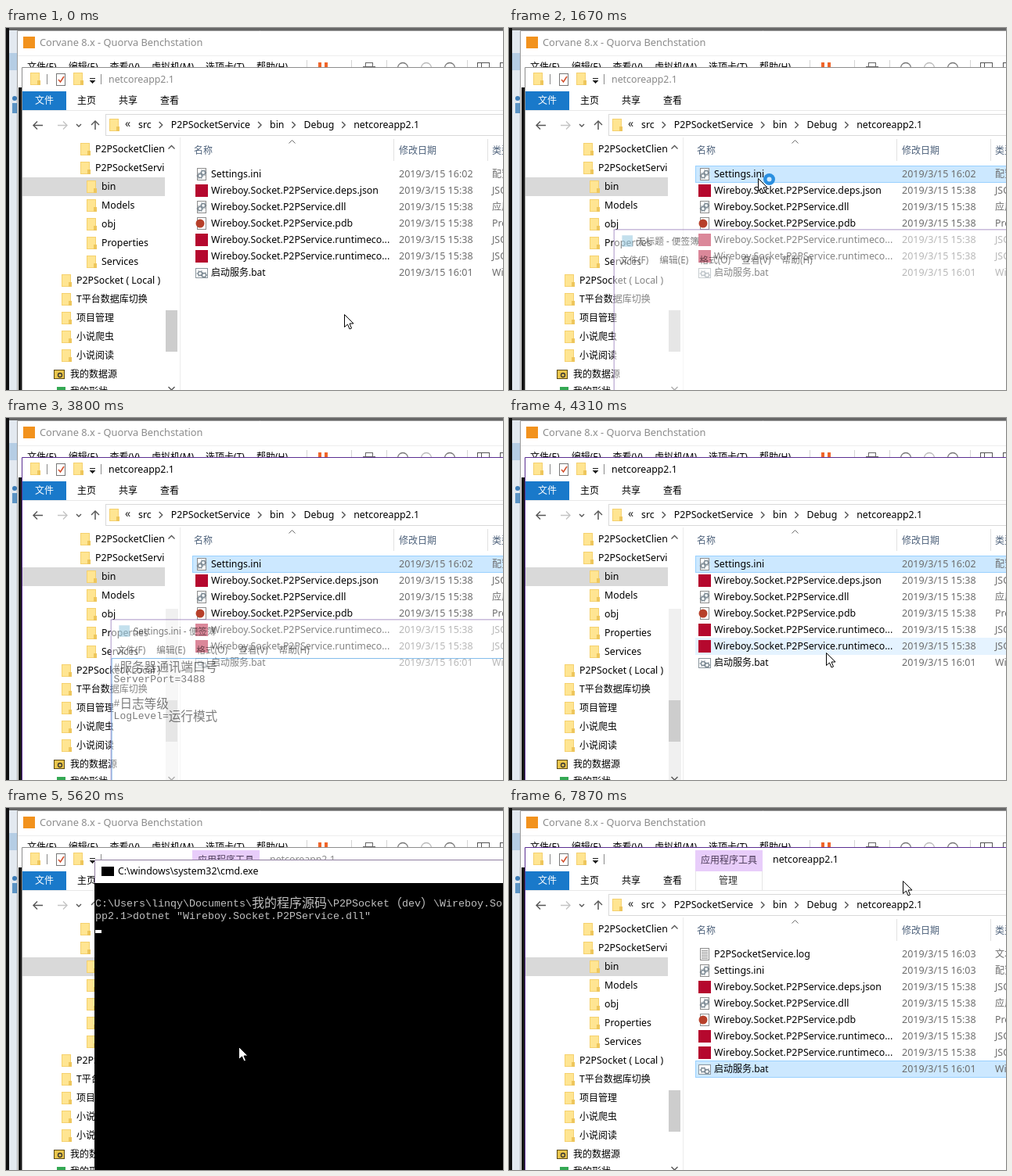
These frames come from a looping animation (635 px wide and 463 px high, 7.99 s). An HTML page with a canvas:

```html
<!DOCTYPE html>
<html lang="zh">
<head>
<meta charset="utf-8">
<style>
html, body { margin: 0; width: 100%; height: 100%; overflow: hidden; background: #fff; }
canvas { display: block; }
</style>
</head>
<body>
<canvas id="stage" width="635" height="463"></canvas>
<script>
const g = document.getElementById('stage').getContext('2d');
const LOOP = 7990, ACCENT = '#5a2d91', BLUE = '#cce8ff', GRAY = '#d9d9d9';
const HAN = /[\u3000-\u9fff\uff00-\uffef]/;
const SANS = '"Noto Sans", "Noto Sans CJK SC", "Noto Sans CJK", sans-serif';
const MONO = '"Liberation Mono", "Noto Sans CJK SC", "Noto Sans CJK", monospace';

// stops of the mouse: ms, x, y
const STOPS = [
  [0, 432, 366], [280, 431, 366], [850, 318, 197], [1000, 318, 192], [2090, 318, 192],
  [2570, 390, 273], [2840, 640, 290], [4070, 640, 270], [4310, 405, 300], [4700, 297, 305],
  [5620, 297, 305], [5770, 311, 301], [5890, 640, 290], [7860, 640, 93], [7870, 503, 93], [LOOP, 503, 93]];

const P = 'Wireboy.Socket.P2PService.';
const FILES = [
  ['Settings.ini', '16:02', '配置', 'gear'],
  [P + 'deps.json', '15:38', 'JSON', 'red'],
  [P + 'dll', '15:38', '应用', 'gear'],
  [P + 'pdb', '15:38', 'Prog', 'disc'],
  [P + 'runtimeco...', '15:38', 'JSON', 'red'],
  [P + 'runtimeco...', '15:38', 'JSON', 'red'],
  ['启动服务.bat', '16:01', 'Win', 'batch']];
const FILES_AFTER = [['P2PSocketService.log', '16:03', '文本', 'lines'],
  ['Settings.ini', '16:03', '配置', 'gear'], ...FILES.slice(1)];
// folders by the x of their icon
const TREE = {
  95: ['P2PSocketClient', 'P2PSocketService'],
  103: ['bin', 'Models', 'obj', 'Properties', 'Services'],
  71: ['P2PSocket ( Local )', 'T平台数据库切换', '项目管理', '小说爬虫', '小说阅读']
};
const TREE_ORDER = [95, 103, 71];

const within = (t, a, b) => t >= a && t < b;
const smooth = p => p * p * (3 - 2 * p);

function mouse(t) {
  const i = STOPS.findIndex(s => s[0] > t);
  const [a, ax, ay] = STOPS[i - 1], [b, bx, by] = STOPS[i];
  const p = smooth((t - a) / (b - a));
  return [ax + (bx - ax) * p, ay + (by - ay) * p];
}

// windows open in three steps of 120 ms and close in one
function opacity(t, open, close) {
  const n = t < open ? 0 : t < close ? Math.min(3, 1 + Math.floor((t - open) / 120)) : t < close + 120 ? 1 : 0;
  return 1 - (1 - n / 3) ** 1.8;
}
const editorAlpha = t => opacity(t, 1670, 3800);
const consoleAlpha = t => opacity(t, 5380, 7190);
const isActive = t => within(t, 1310, 1550) || within(t, 3800, 5380) || t >= 7190;

function selection(t) {
  if (within(t, 1310, 5100)) return [0, within(t, 2090, 3800) ? GRAY : BLUE];
  if (within(t, 5100, 5380)) return [6, BLUE];
  return t >= 5620 ? [7, t < 7190 ? GRAY : BLUE] : [-1];
}

function box(x, y, w, h, color) {
  g.fillStyle = color;
  g.fillRect(x, y, w, h);
}
function frame(x, y, w, h, color) {
  g.strokeStyle = color;
  g.lineWidth = 1;
  g.strokeRect(x + .5, y + .5, w - 1, h - 1);
}
function line(color, width, ...p) {
  g.strokeStyle = color;
  g.lineWidth = width;
  g.beginPath();
  for (let i = 0; i < p.length; i += 2) g.lineTo(p[i], p[i + 1]);
  g.stroke();
}
function ring(x, y, r, color, width) {
  g.strokeStyle = color;
  g.lineWidth = width;
  g.beginPath();
  g.arc(x, y, r, 0, 7);
  g.stroke();
}
function disc(x, y, r, color) {
  g.fillStyle = color;
  g.beginPath();
  g.arc(x, y, r, 0, 7);
  g.fill();
}
// y is the visual middle of the line; returns the right end
function text(s, x, y, color = '#000', size = HAN.test(s) ? 12 : 12.35) {
  g.font = size + 'px ' + SANS;
  g.fillStyle = color;
  g.fillText(s, x, y + 4.3);
  return x + g.measureText(s).width;
}
function menu(items, x, y, gap) {
  for (const s of items.split(' ')) x = text(s, x, y) + gap;
}
// half-width cells of 8 px, full-width cells of 16 px
function cells(s, x, y, color) {
  g.fillStyle = color;
  for (const c of s) {
    const wide = HAN.test(c);
    g.font = (wide ? 16 : 13.33) + 'px ' + MONO;
    g.fillText(c, x, y + (wide ? 6 : 4.5));
    x += wide ? 16 : 8;
  }
}
// arrow head pointing along (dx, dy)
function caret(x, y, dx, dy, r, color = '#555', width = 1.4) {
  line(color, width, x - r * (dx + dy), y - r * (dy + dx), x, y, x - r * (dx - dy), y - r * (dy - dx));
}

function folder(x, y) {
  box(x, y - 8, 12, 16, '#f5d16f');
  box(x + 1, y - 7, 10, 14, '#ffe592');
  box(x + 9, y + 2, 4, 6, '#eec65c');
}
function gear(x, y) {
  ring(x, y, 2.6, '#7e8b95', 1.5);
  for (let a = 0; a < 6; a += Math.PI / 3)
    line('#7e8b95', 1, x + 3 * Math.cos(a), y + 3 * Math.sin(a), x + 4.5 * Math.cos(a), y + 4.5 * Math.sin(a));
}
function fileIcon(kind, y) {
  if (kind == 'red') return box(242, y - 8, 16, 16, '#b5082e');
  if (kind == 'batch') {
    box(242, y - 6, 16, 13, '#fff');
    frame(242, y - 6, 16, 13, '#8a959d');
    gear(248, y + 1);
    return gear(253, y + 3);
  }
  box(244, y - 8, 12, 16, '#fff');
  frame(244, y - 8, 12, 16, '#8c8c8c');
  if (kind == 'disc') disc(248, y, 5.5, '#b7402a');
  else if (kind == 'lines') for (let i = -5; i < 6; i += 2) box(246, y + i, 8, 1, '#999');
  else { gear(248, y + 2); gear(252, y - 2); }
}

function hostWindow() {
  box(0, 0, 635, 463, '#fff');
  box(0, 0, 635, 3, '#666');
  box(0, 0, 4, 463, '#111');
  box(4, 3, 10, 460, '#e3e9f0');
  box(4, 32, 10, 22, '#b5cde4');
  disc(11, 90, 3, '#3d7db8');
  box(8, 96, 6, 13, '#5c94c5');
  line('#9a9a9a', 1, 14.5, 463, 14.5, 3.5, 635, 3.5);
  box(16, 76, 5, 387, '#161616');
  box(22, 11, 15, 15, '#f2921d');
  text('Corvane 8.x - Quorva Benchstation', 43, 19, '#8b8b8b', 12.8);
  box(15, 35, 620, 1, '#eee');
  menu('文件(F) 编辑(E) 查看(V) 虚拟机(M) 选项卡(T) 帮助(H)', 27, 50, 15);
  box(399, 44, 4, 8, '#f0652a');
  box(407, 44, 4, 8, '#f0652a');
  box(422, 50, 7, 2, '#777');
  for (const x of [384, 441, 486, 589]) box(x, 41, 1, 11, '#d5d5d5');
  frame(459, 44, 10, 7, '#666');
  box(456, 49, 16, 3, '#666');
  for (let i = 0; i < 3; i++) ring(507 + 30 * i, 51, 6.5, i == 1 ? '#bbb' : '#777', 1.3);
  frame(602, 44, 16, 12, '#555');
  box(607, 44, 1, 8, '#555');
  frame(631, 44, 10, 12, '#555');
}

function titleBar(t) {
  const tools = t >= 5100;
  folder(31, 65);
  folder(86, 65);
  box(52, 59, 1, 13, '#8a8a8a');
  box(121, 59, 1, 13, '#8a8a8a');
  frame(64, 58, 12, 16, '#777');
  line('#d3502e', 1.6, 67, 66, 69.5, 69, 74, 62);
  box(107, 64, 7, 1, '#222');
  for (let i = 0; i < 4; i++) box(107 + i, 67 + i, 7 - 2 * i, 1, '#222');
  if (tools) {
    box(238, 54, 86, 27, '#e8cdfa');
    box(238, 81, 1, 24, '#e6e6e6');
    box(323, 81, 1, 24, '#e6e6e6');
    text('应用程序工具', 245, 67, '#4b3a58');
    text('管理', 268, 93, '#333');
  }
  text('netcoreapp2.1', tools ? 337 : 131, 65.5, isActive(t) ? '#000' : '#8a8a8a');
  box(21, 81, 56, 24, '#1979ca');
  text('文件', 37, 93, '#fff');
  menu('主页 共享 查看', 91, 93, 29);
  box(21, 105, 614, 1, '#e8e8e8');
}

function addressBar() {
  line('#555', 1.5, 35, 124.5, 47, 124.5);
  caret(35, 124.5, -1, 0, 5);
  line('#c4c4c4', 1.5, 66, 124.5, 78, 124.5);
  caret(78, 124.5, 1, 0, 5, '#c4c4c4');
  caret(93, 126, 0, 1, 3);
  line('#555', 1.5, 114, 119, 114, 130);
  caret(114, 119, 0, -1, 5);
  frame(127, 110, 520, 28, GRAY);
  folder(132, 124);
  text('«', 152, 123, '#222', 14);
  let x = 169;
  for (const s of ['src', 'P2PSocketService', 'bin', 'Debug', 'netcoreapp2.1']) {
    if (x > 169) caret(x - 11, 124, 1, 0, 4);
    x = text(s, x, 124) + 25;
  }
}

function tree(t) {
  box(21, 191, 182, 24, GRAY);
  g.save();
  g.beginPath();
  g.rect(21, 140, 182, 323);
  g.clip();
  let y = 155;
  for (const x of TREE_ORDER) for (const s of TREE[x]) {
    folder(x, y);
    text(s, x + 19, y);
    y += 24;
  }
  box(61, 437, 14, 12, '#e9c54c');
  frame(61, 437, 14, 12, '#5b4a18');
  ring(69, 444, 2.5, '#333', 1.3);
  text('我的数据源', 82, 443);
  box(65, 459, 11, 6, '#34a853');
  text('我的形状', 82, 465);
  g.restore();
  if (within(t, 2450, 5100)) box(204, t < 3800 ? 235 : 244, 16, 228, '#f0f0f0');
  box(204, 361, 15, 53, '#cdcdcd');
  caret(211.5, 150.5, 0, -1, 4);
  caret(211.5, 463, 0, 1, 4);
  box(222, 140, 1, 323, '#ececec');
}

function fileList(t) {
  const ink = '#4c607a', [picked, fill] = selection(t), [mx, my] = mouse(t);
  text('名称', 240, 157, ink);
  text('修改日期', 502, 157, ink);
  text('类型', 621, 157, ink);
  caret(365.5, 143.5, 0, -1, 4, '#666', 1);
  box(495, 142, 1, 28, '#e2e2e2');
  box(615, 142, 1, 28, '#e2e2e2');

  const free = !editorAlpha(t) && !consoleAlpha(t) && mx < 635;
  const hover = free ? Math.floor((my - 176) / 21) : -1;
  (t < 5620 ? FILES : FILES_AFTER).forEach(([name, time, type, icon], i) => {
    const y = 187 + 21 * i;
    if (i == picked) {
      box(238, y - 11, 400, 22, fill);
      if (fill == BLUE) frame(238, y - 11, 400, 22, '#99d1ff');
    } else if (i == hover) box(238, y - 11, 400, 22, '#e5f3ff');
    fileIcon(icon, y);
    text(name, 262, y);
    text('2019/3/15 ' + time, 502, y, '#6d6d6d', 12.5);
    text(type, 621, y, '#6d6d6d');
  });
}

function explorer(t) {
  box(20, 50, 615, 413, '#fff');
  line(isActive(t) ? ACCENT : '#8d8d8d', 1, 20.5, 463, 20.5, 50.5, 635, 50.5);
  titleBar(t);
  addressBar();
  tree(t);
  fileList(t);
}

// a window grows to full size around its centre while it fades in
function layer(alpha, cx, cy, draw) {
  if (!alpha) return;
  const s = 1 - (1 - alpha) * .053;
  g.save();
  g.globalAlpha = alpha;
  g.translate(cx, cy);
  g.scale(s, s);
  g.translate(-cx, -cy);
  draw();
  g.restore();
}

function editor(t) {
  const ready = t >= 1940;
  box(120, 251, 1072, 500, '#fff');
  line(ACCENT, 1, 120.5, 751, 120.5, 251.5, 1192, 251.5);
  box(131, 259, 14, 15, '#8cc3dc');
  text((ready ? 'Settings.ini' : '无标题') + ' - 便签簿', 150, 266.5);
  menu('文件(F) 编辑(E) 格式(O) 查看(V) 帮助(H)', 128, 291.5, 14.5);
  if (!ready) return;
  line('#0078d7', 1, 121.5, 751, 121.5, 302.5, 1192, 302.5);
  ['#服务器通讯端口号', 'ServerPort=3488', '', '#日志等级', 'LogLevel=运行模式']
    .forEach((s, i) => cells(s, 124, 313.5 + 16 * i, '#000'));
  if (within(t, 2090, 2450) || within(t, 2840, 3270)) box(124, 305, 1, 16, '#000');
}

function terminal(t) {
  box(113, 66, 982, 30, '#fff');
  box(113, 96, 982, 510, '#000');
  line('#8f7da0', 1, 113.5, 96, 113.5, 66.5, 1095, 66.5);
  box(122, 75, 16, 12, '#000');
  text('C:\\windows\\system32\\cmd.exe', 143, 80.5);
  cells('C:\\Users\\linqy\\Documents\\我的程序源码\\P2PSocket（dev）\\Wireboy.Socket', 114, 121, '#c0c0c0');
  cells('pp2.1>dotnet "Wireboy.Socket.P2PService.dll"', 114, 137, '#c0c0c0');
  if (!within(t, 6350, 6880)) box(114, 156, 8, 4, '#fff');
}

function pointer(t) {
  const [x, y] = mouse(t).map(Math.round);
  g.save();
  g.translate(x + .5, y + .5);
  const arrow = new Path2D('M0 0V16L4 12.5 6.5 18.5 9 17.5 6.5 11.5H11.5Z');
  g.fillStyle = '#fff';
  g.fill(arrow);
  g.strokeStyle = '#000';
  g.lineWidth = 1;
  g.stroke(arrow);
  if (within(t, 1430, 1940)) {
    disc(14, 1, 7.5, '#2a8fe0');
    disc(14, 1, 3, '#cfe8fb');
  }
  g.restore();
}

function draw(now) {
  const t = now % LOOP;
  hostWindow();
  explorer(t);
  layer(editorAlpha(t), 656, 501, () => editor(t));
  layer(consoleAlpha(t), 604, 321, () => terminal(t));
  pointer(t);
  requestAnimationFrame(draw);
}
requestAnimationFrame(draw);
</script>
</body>
</html>
```
